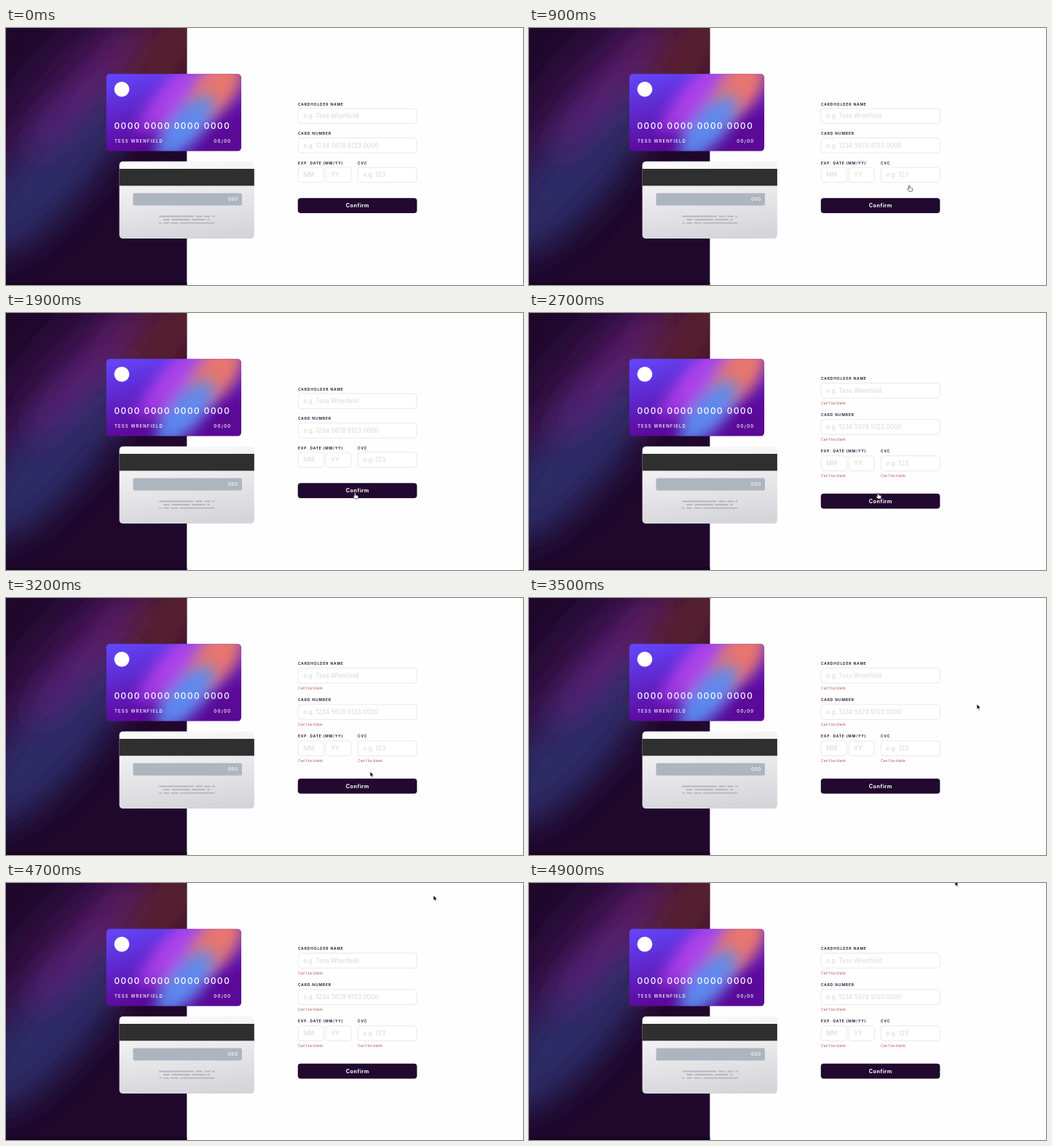
Recreate the animation shown at these times as an HTML page. Size 710x354 px, loop 5100 ms.

```html
<!DOCTYPE html>
<html lang="en">
<head>
<meta charset="utf-8">
<title>Card form</title>
<style>
  html, body { margin: 0; width: 100%; height: 100%; overflow: hidden; background: #fefefe; }
  svg { display: block; width: 710px; height: 354px; }
  text { font-family: Inter, sans-serif; }
  .label { font-size: 5px; font-weight: 600; letter-spacing: .8px; fill: #21092f; }
  .hint { font-size: 8.3px; font-weight: 500; fill: #dedddf; }
  .box { fill: #fff; stroke: #e4e3e6; stroke-width: .8; }
  .error { font-size: 5px; fill: #bd5968; }
  .small { font-size: 6px; font-weight: 500; fill: #fff; letter-spacing: 1.1px; }
  .number { font-size: 11.8px; font-weight: 500; fill: #fff; letter-spacing: 1.5px; }
  .confirm { font-size: 7.2px; font-weight: 700; fill: #fff; letter-spacing: .5px; }
</style>
</head>
<body>
<svg viewBox="0 0 710 354">
  <defs>
    <linearGradient id="frontFill" x1="0" y1="0" x2=".45" y2="1">
      <stop offset="0" stop-color="#6348fe"/>
      <stop offset=".85" stop-color="#5c0a9e"/>
      <stop offset="1" stop-color="#5a0a96"/>
    </linearGradient>
    <linearGradient id="backFill" x1=".4" y1="0" x2=".6" y2="1">
      <stop offset="0" stop-color="#fafafb"/>
      <stop offset="1" stop-color="#d5d4d9"/>
    </linearGradient>
    <filter id="wideBlur" x="-100%" y="-100%" width="300%" height="300%"><feGaussianBlur stdDeviation="22"/></filter>
    <filter id="softBlur" x="-100%" y="-100%" width="300%" height="300%"><feGaussianBlur stdDeviation="10"/></filter>
    <clipPath id="panelClip"><rect width="248.4" height="354"/></clipPath>
    <clipPath id="frontClip"><rect x="137.8" y="63.2" width="185.3" height="106.4" rx="5"/></clipPath>
    <clipPath id="backClip"><rect x="155.6" y="183.7" width="185.3" height="106.4" rx="5"/></clipPath>
  </defs>

  <rect width="710" height="354" fill="#fefefe"/>

  <g clip-path="url(#panelClip)">
    <rect width="249" height="354" fill="#1f082c"/>
    <g id="panelGlow"></g>
    <rect y="350.5" width="249" height="3.5" fill="#16051f"/>
  </g>

  <g clip-path="url(#frontClip)">
    <rect x="137" y="63" width="187" height="107" fill="url(#frontFill)"/>
    <g id="frontGlow"></g>
  </g>
  <circle cx="159" cy="84.3" r="10.4" fill="#fff"/>
  <text class="number" x="148.5" y="139.4">0000 0000 0000 0000</text>
  <text class="small" x="149" y="158">TESS WRENFIELD</text>
  <text class="small" x="285.3" y="158" style="letter-spacing:1.3px">00/00</text>

  <g clip-path="url(#backClip)">
    <rect x="155" y="183" width="187" height="108" fill="url(#backFill)"/>
    <rect x="155" y="194" width="187" height="23.3" fill="#2f2f2f"/>
    <rect x="174.5" y="227.5" width="149.5" height="17" rx="2" fill="#adb5be"/>
    <text class="small" x="305" y="238.3" style="letter-spacing:.7px">000</text>
    <g stroke="#b5b7bd" stroke-width="1.8" stroke-linecap="round">
      <path d="M211 259.5h46m4 0h8m4 0h7m4 0h2"/>
      <path d="M217 264h7m4 0h24m4 0h17m4 0h2"/>
      <path d="M211 268.6h2m4 0h6m4 0h9m4 0h46"/>
    </g>
  </g>

  <g id="form"></g>

  <g id="arrow">
    <path d="M0 0V7.2L1.7 5.7 2.9 8.3 4.1 7.8 3 5.2H5.2Z" fill="#111" stroke="#fff" stroke-width=".6"/>
  </g>
  <g id="hand">
    <path d="M-1.6 1V-3.2Q-1.6-4.2-.8-4.2T0-3.2V-1Q1-1.7 1.5-.7 2.4-1.2 2.8-.3 3.7-.5 3.7.6V2Q3.5 3.2 2.9 4H-1Q-1.8 2.7-3.1 1.2-3.4.3-2.7.2-2.1.2-1.6 1Z" fill="#fff" stroke="#333" stroke-width=".7" stroke-linejoin="round"/>
  </g>
</svg>

<script>
  const LOOP = 5100;
  const CLICK = 2700;
  const byId = id => document.getElementById(id);

  // time, x, y, shape
  const cursorSteps = [
    [0, 0, 0, null],
    [700, 548, 330, 'arrow'],
    [800, 532, 262, 'arrow'],
    [900, 523, 221, 'hand'],
    [1200, 513, 232, 'arrow'],
    [1300, 492, 254, 'arrow'],
    [1400, 479, 262, 'arrow'],
    [1600, 479, 257, 'arrow'],
    [1700, 480, 253, 'hand'],
    [1900, 480, 252, 'hand'],
    [3200, 500, 239, 'arrow'],
    [3300, 555, 199, 'arrow'],
    [3400, 600, 162, 'arrow'],
    [3500, 615, 146, 'arrow'],
    [4400, 593.5, 73.8, 'arrow'],
    [4500, 590, 50, 'arrow'],
    [4600, 588, 31, 'arrow'],
    [4700, 587, 17, 'arrow'],
    [4800, 586, 6, 'arrow'],
    [4900, 585, -3, 'arrow'],
  ];

  // Slanted, blurred light beams
  const beam = (cx, cy, rx, ry, fill, opacity, blur) =>
    `<ellipse cx="${cx}" cy="${cy}" rx="${rx}" ry="${ry}" fill="${fill}" opacity="${opacity}"
      transform="rotate(-50 ${cx} ${cy})" filter="url(#${blur})"/>`;

  byId('panelGlow').innerHTML =
    beam(85, 95, 190, 62, '#3d1450', .7, 'wideBlur') +
    beam(200, 55, 125, 50, '#5c2430', .95, 'wideBlur') +
    beam(68, 192, 155, 52, '#2d2f6a', .95, 'wideBlur') +
    beam(108, 84, 120, 20, '#6b2283', .85, 'wideBlur');

  byId('frontGlow').innerHTML =
    beam(255, 103, 62, 32, '#a565dc', 1, 'softBlur') +
    beam(288, 83, 48, 27, '#e8766e', 1, 'softBlur') +
    beam(246, 137, 56, 22, '#5a8cf0', .95, 'softBlur') +
    beam(222, 96, 62, 15, '#b440ee', .9, 'softBlur');

  const label = (x, y, words) => `<text class="label" x="${x}" y="${y - 4.4}">${words}</text>`;
  const field = (x, y, width, hint) =>
    `<rect class="box" x="${x}" y="${y}" width="${width}" height="20.6" rx="4"/>
     <text class="hint" x="${x + 7}" y="${y + 13.3}">${hint}</text>`;
  const error = (x, y) => `<text class="error" x="${x}" y="${y + 29.2}">Can't be blank</text>`;

  const rows = [
    { y: 111, shift: -14.4, html: y =>
      label(401, y, 'CARDHOLDER NAME') + field(401.2, y, 163, 'e.g. Tess Wrenfield') },
    { y: 151.5, shift: -4.8, html: y =>
      label(401, y, 'CARD NUMBER') + field(401.2, y, 163, 'e.g. 1234 5678 9123 0000') },
    { y: 192, shift: 4.8, html: y =>
      label(401, y, 'EXP. DATE (MM/YY)') + label(483, y, 'CVC') +
      field(401.2, y, 35.3, 'MM') + field(439.2, y, 35, 'YY') + field(483.2, y, 81, 'e.g. 123') },
    { y: 234.2, shift: 14.5, html: y =>
      `<rect x="400.8" y="${y}" width="163.6" height="20.9" rx="4" fill="#21092f"/>
       <text class="confirm" x="466.8" y="${y + 13}">Confirm</text>` },
  ];

  byId('form').innerHTML = rows.map(row => `<g class="row">${row.html(row.y)}</g>`).join('') +
    '<g id="errors">' +
    [[401, 0], [401, 1], [401, 2], [483, 2]]
      .map(([x, i]) => error(x, rows[i].y + rows[i].shift)).join('') + '</g>';

  const rowNodes = [...document.querySelectorAll('.row')];
  const show = (node, visible) => node.setAttribute('visibility', visible ? 'visible' : 'hidden');

  function render(time) {
    const failed = time >= CLICK;
    rowNodes.forEach((node, i) =>
      node.setAttribute('transform', `translate(0 ${failed ? rows[i].shift : 0})`));
    show(byId('errors'), failed);

    const [, x, y, shape] = cursorSteps.filter(step => step[0] <= time).pop();
    for (const name of ['arrow', 'hand']) {
      show(byId(name), name === shape);
      byId(name).setAttribute('transform', `translate(${x} ${y})`);
    }
  }

  const start = performance.now();
  function tick() {
    render((performance.now() - start) % LOOP);
    requestAnimationFrame(tick);
  }
  tick();
</script>
</body>
</html>
```
